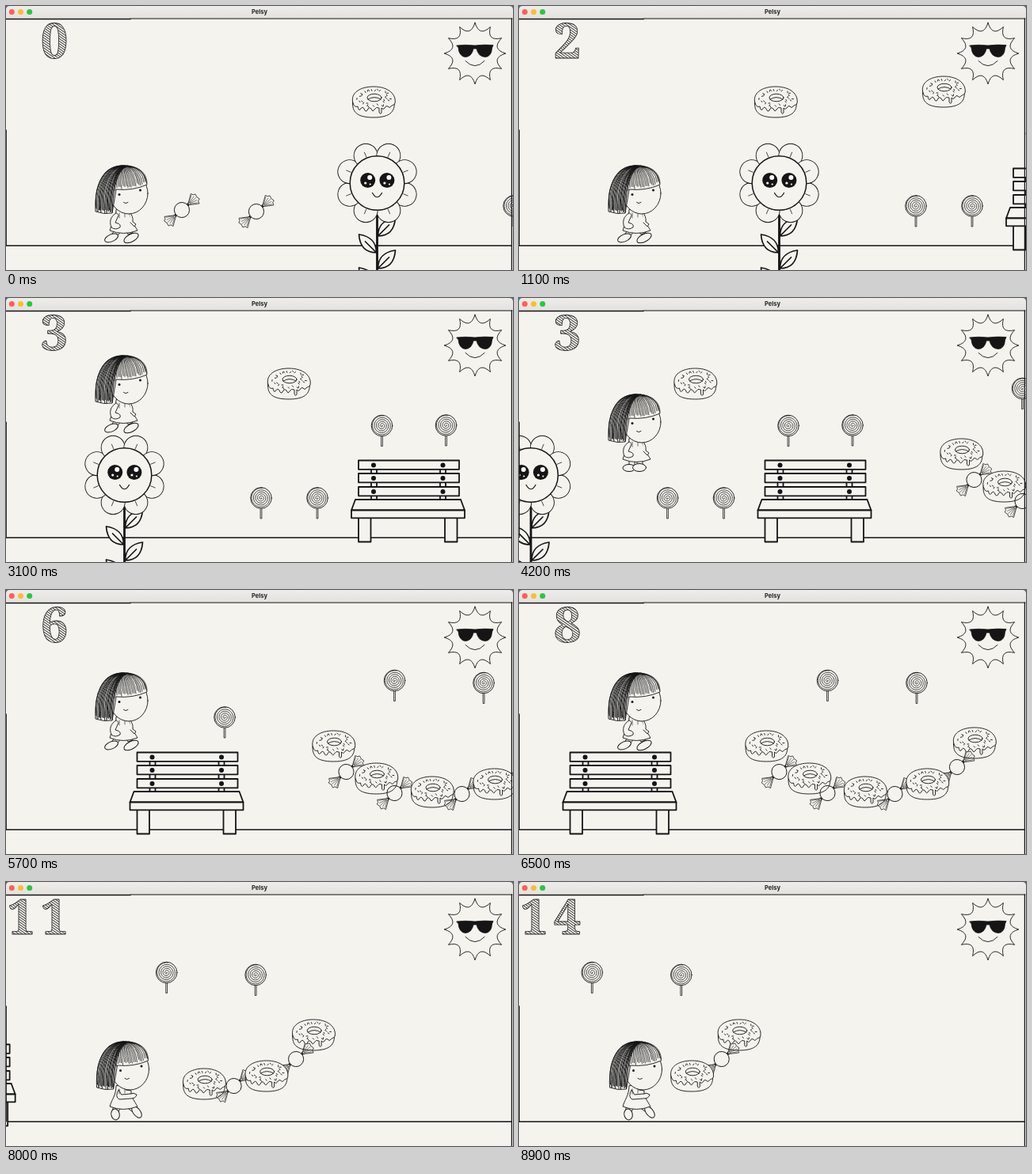
An HTML page for the animation above (9 s loop, 640 by 334 pixels).

```html
<!DOCTYPE html>
<html lang="en">
<head>
<meta charset="utf-8">
<title>Pelsy</title>
<style>
  html, body { margin: 0; width: 100%; height: 100%; overflow: hidden; background: #f4f3ee; }
  svg { display: block; width: 100%; height: 100%; }
  .title { font: bold 7.5px Inter, "Liberation Sans", sans-serif; text-anchor: middle; fill: #222; }
  .score { font: bold 61px "Noto Serif", serif; text-anchor: middle; fill: url(#hatch); stroke: #222; stroke-width: .8; }
</style>
</head>
<body>
<svg viewBox="0 0 640 334" preserveAspectRatio="none">
  <defs>
    <pattern id="hatch" width="2.6" height="2.6" patternUnits="userSpaceOnUse" patternTransform="rotate(35)">
      <rect width="2.6" height="2.6" fill="#f4f3ee"/><rect width="2.6" height=".9" fill="#333"/>
    </pattern>
    <linearGradient id="bar" x2="0" y2="1"><stop stop-color="#eeedeb"/><stop offset="1" stop-color="#e2e1de"/></linearGradient>
  </defs>
  <g id="scene" fill="#f4f3ee" stroke="#151515" stroke-linecap="round" stroke-linejoin="round"></g>
</svg>
<script>
const LOOP = 9000, PAPER = '#f4f3ee', INK = '#151515';
const GRAVITY = 0.0008, LEAP = 0.49, FLOWER_TOP = 129, BENCH_TOP = 97;
const scene = document.getElementById('scene');

function add(tag, attrs = {}, parent = scene) {
  const el = document.createElementNS('http://www.w3.org/2000/svg', tag);
  for (const key in attrs) el.setAttribute(key, attrs[key]);
  parent.appendChild(el);
  return el;
}
const group = (parent, attrs) => add('g', attrs, parent);
const path = (parent, d, width = 1, fill = 'none') => add('path', { d, fill, 'stroke-width': width }, parent);
const oval = (parent, cx, cy, rx, ry = rx, width = 1, fill = PAPER) =>
  add('ellipse', { cx, cy, rx, ry, fill, 'stroke-width': width }, parent);
const dot = (parent, x, y, r, fill = INK) => add('circle', { cx: x, cy: y, r, fill, stroke: 'none' }, parent);

function seeded(seed) {
  return () => (seed = (seed * 16807) % 2147483647) / 2147483647;
}
const polar = (r, a) => [(r * Math.cos(a)).toFixed(2), (r * Math.sin(a)).toFixed(2)];

function drawFrame() {
  add('rect', { width: 640, height: 16, fill: '#53717f', stroke: 'none' });
  add('path', { d: 'M0 16V5Q0 0 5 0H635Q640 0 640 5V16Z', fill: 'url(#bar)', stroke: 'none' });
  ['#fe5f57', '#febc2e', '#28c840'].forEach((color, i) => dot(scene, 7.3 + i * 11.2, 7.6, 3.5, color));
  add('text', { x: 320, y: 10.3, class: 'title', stroke: 'none' }).textContent = 'Pelsy';
  path(scene, 'M0 16.4H157', 1.5);
  path(scene, 'M157 16H639', 1.1);
  path(scene, 'M638.4 16V334', 1.3);
  path(scene, 'M.4 157V303', 1);
}

function drawSun() {
  const sun = group(scene, { transform: 'translate(592 60)' });
  let d = '';
  for (let i = 0; i <= 12; i++) {
    const a = i * Math.PI / 6 - Math.PI / 2;
    d += i ? `Q${polar(21, a - Math.PI / 12)} ${polar(38.8, a)}` : `M${polar(38.8, a)}`;
  }
  path(sun, d + 'Z', 0.9, PAPER);
  path(sun, 'M-23 -10Q-12 -11.5 0 -10Q12 -11.5 23 -10.5L21.5 -7Q21 4 13 4.5Q4 4 2 -6H-2Q-4 4 -12 4.5Q-20 4 -21 -7Z', 0.8, INK);
  path(sun, 'M-12 9.5Q0 22 12 9.5', 0.9);
}

function drawDonut(g) {
  path(g, 'M-26 -3C-28 11 -24 20 0 20C23 20 28 11 26 -3', 0.9);
  path(g, 'M-26 2C-30 -11 -17 -19 0 -19C19 -19 29 -9 27 2C26 5 23 4 22 6Q20 9 18 6Q16 4 14 8Q12 11 10 8V14Q8 17 7 13V8Q3 6 1 10Q-1 14 -3 9Q-6 6 -8 11Q-10 14 -12 9Q-14 5 -17 10Q-19 12 -20 6Q-24 8 -26 2Z', 0.9, PAPER);
  const rnd = seeded(77);
  for (let i = 0; i < 30; i++) {
    const a = i * 2.4, r = 0.62 + 0.32 * rnd(), turn = rnd() * 6.3;
    const x = 25 * r * Math.cos(a), y = -5 + 13.5 * r * Math.sin(a);
    path(g, `M${x.toFixed(1)} ${y.toFixed(1)}l${polar(1.9, turn)}`, 0.9);
  }
  oval(g, 1, -5, 9, 4.8, 0.9);
  path(g, 'M-7 -3Q1 -8 9 -3', 0.9);
}

function drawCandy(g) {
  const inner = group(g, { transform: 'rotate(-41)' });
  for (const side of [-1, 1]) {
    const wrap = group(inner, { transform: `scale(${side} 1)` });
    path(wrap, 'M10 0L22 -8L23.5 -5L26 -4L25 0L26 4L23 5L22 8Z', 0.7, PAPER);
    for (let y = -6; y <= 6; y += 3) path(wrap, `M13 ${y / 5}L${24 - Math.abs(y) / 2} ${y}`, 0.5);
    path(wrap, 'M10 -1.5L11.5 1.5M10 1.5L11.5 -1.5', 0.8);
  }
  oval(inner, 0, 0, 9.6, 9.6, 0.9);
}

function drawLollipop(g) {
  path(g, 'M-.9 13V26H.9V13', 0.8, PAPER);
  oval(g, 0, 0, 13.3, 13.3, 0.9);
  const end = 9.6 * Math.PI;
  let d = 'M0 0';
  for (let a = 0; a < end; a += 0.25) d += 'L' + polar(0.8 + 12 * a / end, a);
  path(g, d, 0.75);
}

function drawFlower(g) {
  path(g, 'M0 34V115', 2.8);
  const leaf = (y, side) => {
    const l = group(g, { transform: `translate(0 ${y}) scale(${side} 1)` });
    path(l, 'M1 0C1 -13 9 -21 23 -23C22 -9 15 0 1 0ZM1 0L15 -14', 1.7, PAPER);
  };
  leaf(67, 1); leaf(88, -1); leaf(108, 1); leaf(130, -1);
  for (let i = 0; i < 8; i++) {
    const petal = group(g, { transform: `rotate(${22.5 + i * 45})` });
    oval(petal, 37.5, 0, 15, 15, 0.9);
    path(petal, 'M36 0L42 0', 0.7);
  }
  oval(g, 0, 0, 34.3, 34.3, 1.5);
  for (const x of [-11.8, 12.4]) {
    dot(g, x, -3.5, 9.5);
    dot(g, x + 2.5, -7, 3, '#fff');
    dot(g, x - 3, 0, 1.6, '#fff');
    dot(g, x + 3, 1.5, 1.1, '#fff');
  }
  path(g, 'M-6 12.5Q0 23 6 12.5', 1.2);
}

function drawBench(g) {
  const box = (x, y, w, h) => add('rect', { x, y, width: w, height: h, 'stroke-width': 1.8 }, g);
  for (const x of [-47, 40]) box(x, 206, 7, 49);
  for (const y of [205.5, 222, 239]) {
    box(-63, y, 127, 11.3);
    for (const x of [-44, 43.5]) dot(g, x, y + 6, 3);
  }
  for (const x of [-63, 46]) box(x, 278, 15.5, 30.5);
  path(g, 'M-67 255H66L71 268.5H-72Z', 1.8, PAPER);
  box(-72, 268.5, 143, 9.8);
}

function drawHead(g) {
  oval(g, 155, 237, 24, 26, 0.9);
  path(g, 'M150 202C126 200 111 222 113 260Q124 264 134 262L139 232Q160 234 178 226Q175 203 150 202Z', 0.9, PAPER);
  const rnd = seeded(5);
  for (let i = 0; i <= 17; i++) {
    const k = i / 17, j = rnd() * 5;
    path(g, `M${146 + 6 * k} ${202 + k}C${120 + 20 * k} ${203 + 5 * k} ${111 + 24 * k} 232 ${114 + 20 * k} ${256 + 2 * k + j}`, 0.7 + 0.5 * rnd());
  }
  for (let i = 0; i <= 20; i++) {
    const k = i / 20, j = rnd() * 5;
    path(g, `M${146 + 8 * k} 202Q${134 + 43 * k} ${213 - 8 * k} ${138 + 40 * k} ${234 - 8 * k - j}`, 0.75);
  }
  dot(g, 143, 238.5, 1.5);
  dot(g, 169.5, 233, 1.5);
  path(g, 'M148.5 248.5Q151 251 154 248.5', 0.9);
}

function drawPose(parent, name) {
  const g = group(parent);
  const limb = d => path(g, d, 0.9, PAPER);
  const shoe = (x, y, rx, ry, turn) =>
    add('ellipse', { rx, ry, 'stroke-width': 1, transform: `translate(${x} ${y}) rotate(${turn})` }, g);
  if (name === 'stride') {
    limb('M138 282L133 290L139 293L146 284Z');
    limb('M150 284L154 289L160 287L157 282Z');
    shoe(133, 293.5, 9, 4.5, -24);
    shoe(158, 293.5, 10, 4.8, -28);
  } else if (name === 'stand') {
    limb('M139 282V292H146V282Z');
    limb('M149 282V292H156V282Z');
    shoe(139, 295, 8, 4.5, 0);
    shoe(152, 294.5, 8.5, 5, 0);
  } else {
    limb('M136 282L134 291L141 292L146 284Z');
    limb('M151 284L160 291L164 285L158 280Z');
    shoe(138, 294, 5.2, 7, -12);
    shoe(165, 291, 4.5, 8.5, -38);
  }
  limb('M139 258C139 270 133 276 131 284Q148 291 166 284C162 277 156 269 155 258Z');
  if (name === 'reach') {
    limb('M142 263Q137 272 143 275L157 274Q164 274 165 269Q161 266 157 268L146 269Z');
    limb('M151 263L158 264V268');
  } else {
    limb('M139 262C132 266 130 273 133 280Q138 284 144 280Q145 276 141 275L138 274L142 265Z');
    limb('M156 261Q161 266 160 273L164 276L162 279L157 274');
  }
  path(g, 'M143 262V268M150 262V267', 0.6);
  return g;
}

const NEVER = Infinity;
// kind, world x, y, moment of pickup
const ITEMS = [
  [drawCandy, 222, 258, 170], [drawCandy, 316, 260, 890],
  [drawCandy, 1028, 230, 7480], [drawCandy, 1089, 257, 7960],
  [drawCandy, 1174, 258, 8660], [drawCandy, 1252.5, 224, NEVER],
  [drawDonut, 464, 121, 2080], [drawDonut, 676, 108, 4900],
  [drawDonut, 1012, 197, 7340], [drawDonut, 1066, 238, 7760],
  [drawDonut, 1136.5, 255, 8320], [drawDonut, 1215, 245, NEVER], [drawDonut, 1274.5, 193, NEVER],
  [drawLollipop, 641, 253, 4310], [drawLollipop, 712, 253, 4740],
  [drawLollipop, 793.5, 161.5, 5650], [drawLollipop, 874.5, 161, 6350],
  [drawLollipop, 1089, 114.5, NEVER], [drawLollipop, 1201.5, 117.5, NEVER]
];

path(scene, 'M0 303.2H638', 1.4);
drawSun();
const world = group(scene);
drawFlower(group(world, { transform: 'translate(468.5 224)' }));
drawBench(group(world, { transform: 'translate(827 0)' }));
const items = ITEMS.map(([draw, x, y, picked]) => {
  const el = group(world, { transform: `translate(${x} ${y})` });
  draw(el);
  return { el, picked };
});
const girl = group(scene);
const poses = Object.fromEntries(['stride', 'reach', 'stand'].map(name => [name, drawPose(girl, name)]));
const head = group(girl);
drawHead(head);
const tens = add('text', { x: 19, y: 65.5, class: 'score' });
const ones = add('text', { x: 61, y: 65.5, class: 'score' });
drawFrame();

// time, distance walked; flat stretches are rests
const WALK = [[0, 0], [1100, 140], [2300, 292], [2880, 292], [3100, 319], [4200, 453.5],
  [5350, 598.5], [5700, 598.5], [7300, 800.5], [9000, 1009]];

function distance(t) {
  const i = WALK.findIndex(([end]) => t < end);
  const [t0, d0] = WALK[i - 1], [t1, d1] = WALK[i];
  return d0 + (d1 - d0) * (t - t0) / (t1 - t0);
}

function leap(s, landing) {
  const y = LEAP * s - GRAVITY * s * s / 2;
  return s > LEAP / GRAVITY ? Math.max(y, landing) : y;
}
const fall = (s, from) => Math.max(0, from - GRAVITY * s * s / 2);

function height(t) {
  if (t < 1450) return 0;
  if (t < 3850) return leap(t - 1450, FLOWER_TOP);
  if (t < 4700) return fall(t - 3850, FLOWER_TOP);
  if (t < 7180) return leap(t - 4700, BENCH_TOP);
  return fall(t - 7180, BENCH_TOP);
}

function render(t) {
  const d = distance(t), step = (d + 5) % 46;
  const pose = step < 15 ? 'stride' : step < 37 ? 'reach' : 'stand';
  world.setAttribute('transform', `translate(${-d} 0)`);
  girl.setAttribute('transform', `translate(0 ${-height(t)})`);
  head.setAttribute('transform', `translate(${pose === 'reach' ? 1.5 : 0} 0)`);
  for (const name in poses) poses[name].style.display = name === pose ? '' : 'none';
  for (const item of items) item.el.style.display = t < item.picked ? '' : 'none';
  const score = items.filter(item => t >= item.picked + 80).length;
  ones.textContent = score % 10;
  tens.textContent = score > 9 ? 1 : '';
}

const start = performance.now();
function tick() {
  const t = (performance.now() - start) % LOOP;
  render(Math.floor(t / 100) * 100);
  requestAnimationFrame(tick);
}
tick();
</script>
</body>
</html>
```
